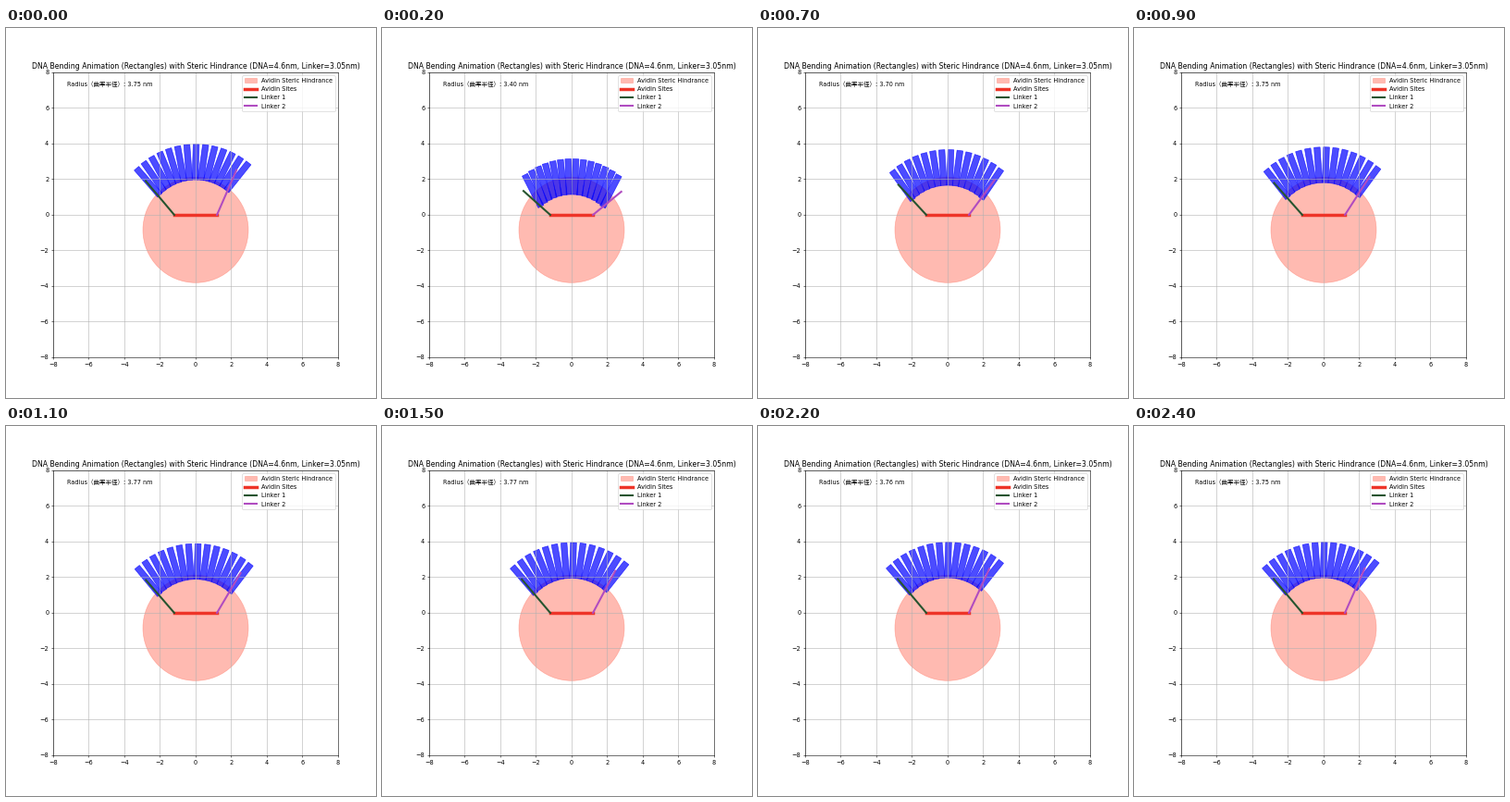
A matplotlib script that plays this animation: 400 by 400 pixels, repeating every 2.5 s.

```python
import numpy as np
import matplotlib.pyplot as plt
from matplotlib.animation import FuncAnimation
from matplotlib.patches import Circle, Rectangle

plt.rcParams["font.family"] = ["DejaVu Sans", "Noto Sans CJK JP"]
plt.rcParams["font.size"] = 9.4

FRAMES, INTERVAL = 25, 100
N_RECT, WIDTH, HEIGHT = 14, 0.34, 2.0
SITE = 1.2
NUDGE = 0.001  # settles half-pixel rounding of the grid lines


def pose(step):
    """Strand and linker geometry: exponential settling plus a slow drift."""
    u = min(np.exp(-0.32 * (step - 5)), 1.4)
    radius = 3.796 - 0.0018 * step - 0.227 * u ** 1.6
    apex = 2.97 - 0.59 * u
    arc = np.linspace(45.3 - 4 * u, -(43.9 - 0.2 * step - 2.3 * u), N_RECT)
    tilt = np.linspace(41 - 10 * u, -(38.6 - 8 * u), N_RECT)
    end1 = -2.8 + 0.07 * u, 1.9 - 0.4 * u
    end2 = (2.68 - 0.0155 * step + 0.1 * u,
            2.2 + 0.0125 * step - 0.66 * u)
    return radius, apex, arc, tilt, end1, end2


fig, ax = plt.subplots(figsize=(8, 8), dpi=50)
ax.set_xlim(-8 + NUDGE, 8 + NUDGE)
ax.set_ylim(-8 - NUDGE, 8 - NUDGE)
ax.set_aspect("equal")
ticks = np.arange(-8, 9, 2)
ax.set_xticks(ticks, [f"{t}".replace("-", "\u2212") for t in ticks])
ax.set_yticks(ticks, [f"{t}".replace("-", "\u2212") for t in ticks])
ax.grid(True)
ax.set_title("DNA Bending Animation (Rectangles) with Steric Hindrance "
             "(DNA=4.6nm, Linker=3.05nm)", fontsize=11.1)

ax.add_patch(Circle((0, -0.85), 2.96, color="#ff7765", alpha=0.5,
                    label="Avidin Steric Hindrance"))
rects = [ax.add_patch(Rectangle((0, 0), WIDTH, HEIGHT, color="blue", alpha=0.7,
                                rotation_point="center"))
         for _ in range(N_RECT)]
ax.plot([-SITE, SITE], [0, 0], color="#ee3428", lw=5, label="Avidin Sites")
linker1, = ax.plot([], [], color="#26542f", lw=3, label="Linker 1")
linker2, = ax.plot([], [], color="#b04cc0", lw=3, label="Linker 2")
label = ax.text(0.05, 0.95, "", transform=ax.transAxes)
ax.legend(loc="upper right")


def update(frame):
    # The loop opens on the settled pose, then restarts from the tight bend.
    step = (frame - 1) % FRAMES + 1
    radius, apex, arc, tilt, end1, end2 = pose(step)
    phi = np.radians(arc)
    xs = -radius * np.sin(phi)
    ys = apex - radius * (1 - np.cos(phi))
    for rect, x, y, angle in zip(rects, xs, ys, tilt):
        rect.set_xy((x - WIDTH / 2, y - HEIGHT / 2))
        rect.set_angle(angle)
    for line, x0, (x, y) in ((linker1, -SITE, end1), (linker2, SITE, end2)):
        line.set_data([x0, x], [0, y])
    label.set_text(f"Radius（曲率半径）: {radius:.2f} nm")
    return [*rects, linker1, linker2, label]


anim = FuncAnimation(fig, update, frames=FRAMES, interval=INTERVAL,
                     repeat=True, repeat_delay=0, blit=False)
plt.show()
```
